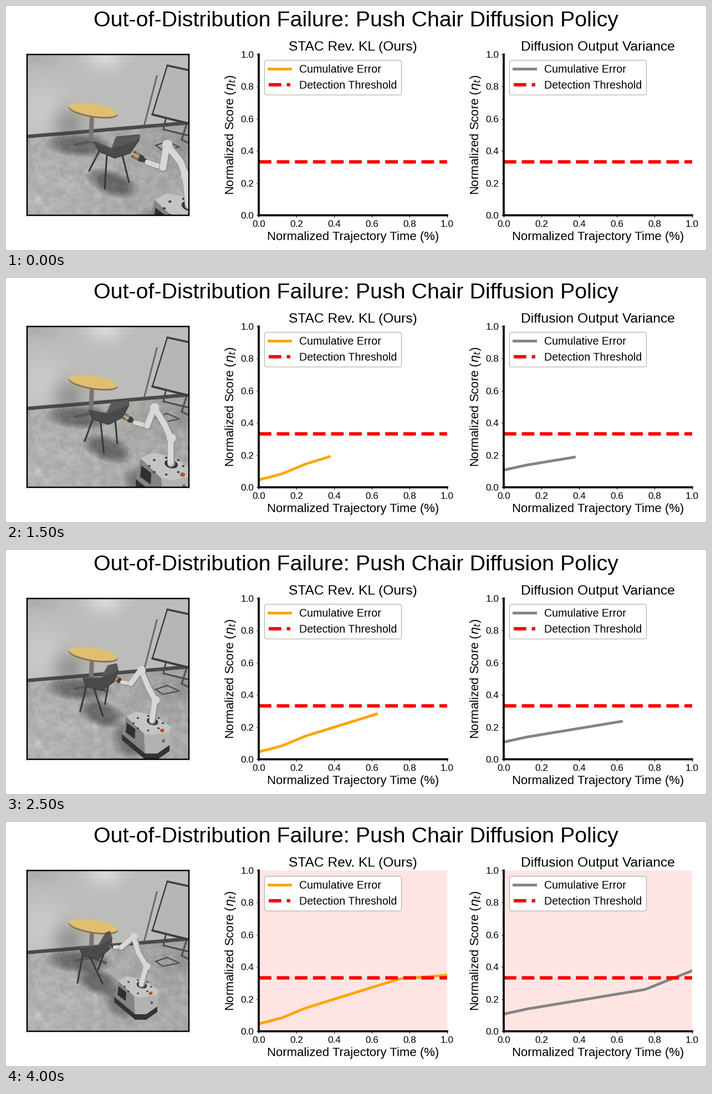
Recreate the animation shown at these times as a matplotlib script. Size 1263 by 443 pixels, loop 6500 ms.

```python
import numpy as np
import matplotlib.pyplot as plt
from matplotlib.animation import FuncAnimation
from matplotlib.patches import Ellipse, Polygon

W, H = 1263, 443
DPI = H / 5
STEP_MS, STEPS, LOOP = 500, 8, 13     # the last step is held to the end of the loop
PUSH_STEPS = 6                        # the robot stops pushing here
X0, X1, Y0, Y1 = 38, 330, 88, 380     # photo panel, in stage pixels
THRESHOLD = 0.333
PINK = "#fee5e4"

plt.rcParams["font.family"] = "Liberation Sans"
fig = plt.figure(figsize=((W + 1e-3) / DPI, (H + 1e-3) / DPI), dpi=DPI, facecolor="white")


def panel(x0, y0, x1, y1):
    return fig.add_axes([x0 / W, 1 - y1 / H, (x1 - x0) / W, (y1 - y0) / H])


def grey(v):
    return (v / 255,) * 3


# ---------- score charts ----------
time = np.linspace(0, 1, STEPS + 1)


def chart(x, title, color, key_times, key_scores):
    ax = panel(x, Y0, x + 340.2, Y1)
    line, = ax.plot([], [], color=color, lw=4, label="Cumulative Error")
    ax.plot([0, 1], [THRESHOLD] * 2, "--", color="red", lw=5, label="Detection Threshold")
    ax.set(xlim=(0, 1), ylim=(0, 1))
    ax.set_title(title, fontsize=20)
    ax.set_xlabel("Normalized Trajectory Time (%)", fontsize=18)
    ax.set_ylabel(r"Normalized Score ($\eta_t$)", fontsize=18)
    ax.tick_params(labelsize=14)
    ax.spines[["top", "right"]].set_visible(False)
    ax.spines[["left", "bottom"]].set_linewidth(3)
    ax.legend(loc="upper left", fontsize=16, framealpha=1, edgecolor=grey(178))
    return ax, line, np.interp(time, key_times, key_scores)


fig.suptitle("Out-of-Distribution Failure: Push Chair Diffusion Policy", fontsize=32)
charts = [
    chart(455.8, "STAC Rev. KL (Ours)", "orange",
          [0, 0.125, 0.25, 0.75, 1], [0.046, 0.084, 0.145, 0.327, 0.349]),
    chart(897.9, "Diffusion Output Variance", grey(132),
          [0, 0.125, 0.75, 1], [0.107, 0.139, 0.260, 0.377]),
]

# ---------- photo panel: room ----------
photo = panel(X0, Y0, X1, Y1)
photo.set(xlim=(X0, X1), ylim=(Y1, Y0), xticks=[], yticks=[])
for spine in photo.spines.values():
    spine.set_linewidth(2)
    spine.set_zorder(50)


def poly(pts, color, z, **kw):
    return photo.add_patch(Polygon(pts, facecolor=color, zorder=z, **kw))


def stroke(pts, color, px, z, cap="round"):
    x, y = np.asarray(pts, float).T
    return photo.plot(x, y, color=color, lw=px * 72 / DPI, zorder=z,
                      solid_capstyle=cap, solid_joinstyle="round")[0]


def disc(x, y, w, h, color, z, angle=0, **kw):
    return photo.add_patch(Ellipse((x, y), w, h, angle=angle, facecolor=color, zorder=z, **kw))


def soft_shadow(x, y, w, h, z, angle=0, alpha=0.09):
    return [disc(x, y, w * k, h * k, "black", z, angle, alpha=alpha, lw=0)
            for k in (1.1, 0.95, 0.8, 0.65)]


def glow(x, y, cx, cy, sx, sy):
    return np.exp(-((x - cx) / sx) ** 2 - ((y - cy) / sy) ** 2)


def mottle(rng, size, blur):
    f = np.fft.fftfreq(size)
    keep = np.exp(-(f[:, None] ** 2 + f ** 2) * (blur * 4.4) ** 2)
    n = np.fft.ifft2(np.fft.fft2(rng.standard_normal((size, size))) * keep).real
    return n / n.std()


def draw_room():
    size = X1 - X0
    rng = np.random.default_rng(4)
    x, y = np.meshgrid(np.arange(size) + X0 + 0.5, np.arange(size) + Y0 + 0.5)
    wall = (188 + 28 * glow(x, y, 178, 92, 32, 26) + 16 * glow(x, y, 70, 195, 45, 50)
            - 16 * glow(x, y, 55, 88, 45, 24) - 42 * glow(x, y, 112, 214, 30, 30))
    floor = (170 + 10 * glow(x, y, 70, 350, 90, 70) - 14 * glow(x, y, 310, 250, 60, 50)
             + 4 * mottle(rng, size, 4) + 3 * mottle(rng, size, 1.3))
    tone = np.where(y < 237 - (x - X0) * 0.085, wall, floor)
    rgb = np.stack([tone, tone, tone - 2], axis=-1) / 255
    photo.imshow(rgb.clip(0, 1), extent=(X0, X1, Y1, Y0), aspect="auto", zorder=0)

    stroke([(38, 237), (330, 212)], grey(74), 6.5, 1, "butt")
    soft_shadow(132, 252, 108, 40, 1.5, 3, 0.1)

    # leaning pole, board and its stand
    poly([(271, 126), (274, 126), (251, 216), (248, 216)], grey(105), 2)
    board = [(264, 197), (291, 108), (332, 117), (332, 214)]
    poly(board, grey(182), 2)
    for a, b, px in ((0, 1, 2.5), (1, 2, 3.5), (0, 3, 4)):
        stroke([board[a], board[b]], grey(62), px, 2.2)
    stroke([(288, 206), (284, 224), (332, 236)], grey(75), 3, 2)
    stroke([(326, 214), (317, 243), (332, 250)], grey(80), 3, 2)
    stroke([(270, 253), (291, 246), (313, 256), (283, 262), (270, 253)], grey(82), 2.4, 2)

    # table
    stroke([(124, 252), (154, 246), (180, 256)], grey(88), 5, 3)
    stroke([(155, 200), (153, 246)], grey(118), 8, 3, "butt")
    disc(157.5, 191, 89, 23, (0.56, 0.45, 0.27), 4, 9)
    disc(157.5, 188.5, 88, 22, (0.88, 0.75, 0.46), 4.1, 9)


draw_room()

# ---------- moving parts: each blends from a start pose to an end pose ----------
SHELL = ([(199, 238), (241, 234), (240, 243), (224, 267),
          (196, 276), (168, 264), (160, 247), (191, 259)],
         [(180, 202), (187, 199), (191, 212), (187, 230),
          (166, 249), (138, 243), (133, 228), (167, 224)])
FEET = ([(150, 299), (178, 332), (222, 320)],
        [(129, 292), (174, 293), (166, 268)])
# fingertip, hand, lower elbow, upper elbow, upper arm, shoulder
ARM = ([(230, 269), (256, 284), (284, 294), (291, 252), (316, 284), (325, 308)],
       [(188, 222), (197, 228), (209, 228), (231, 208), (240, 238), (254, 262)])
ARM_WIDTH = (16, 11.5)
BASE = ((255, 337), (193, 278))
BASE_SCALE = (1.45, 1)

# robot base outline, clockwise from its left corner
BODY = np.array([(9, 10), (25, 2), (55, 8), (83, 28), (80, 60), (60, 74), (40, 74), (2, 42)])
DECK = np.vstack([BODY[:4], [(78, 36), (50, 41), (38, 38)]])
SIDE = [BODY[0], DECK[-1], BODY[6], BODY[7]]
SKIRT = np.vstack([BODY[4:] - (0, 3), BODY[:3:-1] + (0, 7)])
WINDOW = [(10, 20), (24, 31), (23, 47), (8, 36)]


def blend(pair, u):
    start, end = np.array(pair, float)
    return start + (end - start) * u


def draw_chair(u):
    shell, feet = blend(SHELL, u), blend(FEET, u)
    tops = [shell[5], shell[4:6].mean(axis=0), shell[3:5].mean(axis=0)]
    parts = soft_shadow(*feet.mean(axis=0) + (9, 5), 90 - 16 * u, 42, 5, 20, 0.11)
    parts += [stroke(leg, grey(56), 3, 6) for leg in zip(tops, feet)]
    parts.append(poly(shell, grey(74), 7, edgecolor=grey(62), lw=1.5, joinstyle="round"))
    parts.append(poly(shell[[0, 1, 2, 7]], grey(88), 7.1))
    parts.append(stroke(shell[[6, 7, 0]], grey(100), 1.4, 7.2))
    return parts


def draw_base(u):
    origin, s = blend(BASE, u), blend(BASE_SCALE, u)

    def at(pts):
        return np.array(pts) * s + origin

    parts = soft_shadow(*at((12, 50)), 46 * s, 60 * s, 5, -30, 0.08)
    for z, (pts, tone) in enumerate(((BODY, 178), (SIDE, 132), (DECK, 196),
                                     (SKIRT, 52), (WINDOW, 48))):
        parts.append(poly(at(pts), grey(tone), 8 + z / 10))
    for a in np.arange(8) * np.pi / 4:
        parts.append(disc(*at((45 + 24 * np.cos(a), 21 + 12 * np.sin(a))),
                          4 * s, 3 * s, grey(70), 8.5))
    parts.append(disc(*at((52, 18)), 19 * s, 12 * s, (0.2, 0.2, 0.29), 8.5, 15))
    parts.append(disc(*at((68, 33)), 7 * s, 6 * s, (0.72, 0.32, 0.17), 8.6))
    parts.append(disc(*at((70, 50)), 5 * s, 6 * s, grey(105), 8.6))
    return parts


def draw_arm(u):
    joints, w = blend(ARM, u), blend(ARM_WIDTH, u)
    mount = blend(BASE, u) + np.array((52, 17)) * blend(BASE_SCALE, u)
    tip, hand = joints[:2]
    reach = hand - tip
    side = np.array([-reach[1], reach[0]]) / np.hypot(*reach) * w * 0.28

    parts = [stroke([tip + reach * 0.5, hand], grey(62), w * 0.5, 9)]
    for d in (side, -side):
        parts.append(stroke([tip + d, tip + reach * 0.6 + d], grey(66), w * 0.22, 9.1))
        parts.append(stroke([tip + reach * 0.12 + d, tip + reach * 0.3 + d],
                            (0.70, 0.43, 0.22), w * 0.25, 9.2))
    for z, pts, k in ((9.3, joints[1:3], 0.75), (9.5, np.vstack([joints[2:], mount]), 1)):
        parts.append(stroke(pts, grey(148), w * k, z))
        parts.append(stroke(pts - (1, 0.5), grey(216), w * k * 0.74, z + 0.1))
    for p in joints[[3, 5]]:
        parts.append(disc(*p, w * 1.15, w * 1.15, grey(214), 9.7))
    return parts


movers = []


def update(frame):
    step = min(frame, STEPS)
    u = min(step / PUSH_STEPS, 1) ** 1.4
    for part in movers:
        part.remove()
    movers[:] = draw_chair(u) + draw_base(u) + draw_arm(u)
    for ax, line, score in charts:
        line.set_data(time[:step + 1], score[:step + 1])
        line.set_visible(step > 0)
        ax.set_facecolor(PINK if score[step] > THRESHOLD else "white")
    return movers


anim = FuncAnimation(fig, update, frames=LOOP, interval=STEP_MS, repeat=True,
                     repeat_delay=0, blit=False, cache_frame_data=False)
plt.show()
```
